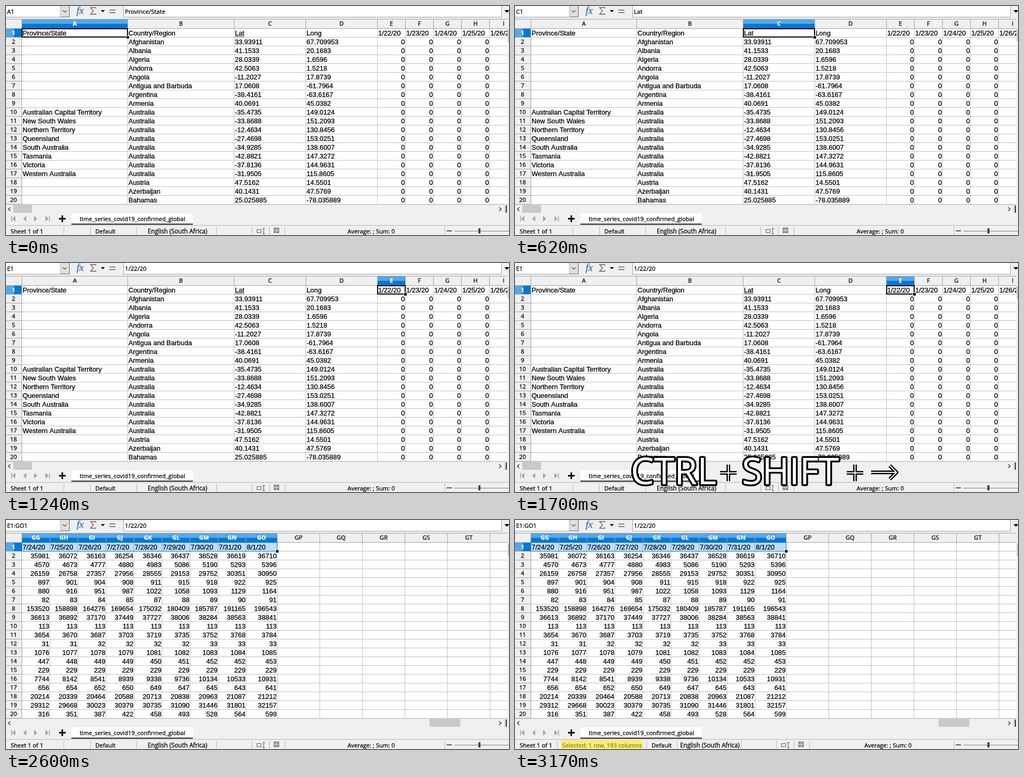
Write an HTML page with a canvas that moves like this. It is 969 px wide and 443 px high and loops after 4.07 s.

```html
<!DOCTYPE html>
<html lang="en">
<head>
<meta charset="utf-8">
<title>Spreadsheet: select to the end of the row</title>
<style>
html, body { margin: 0; width: 100%; height: 100%; overflow: hidden; background: #f0f0f0; }
canvas { display: block; }
</style>
</head>
<body>
<canvas id="stage" width="969" height="443"></canvas>
<script>
const ctx = document.getElementById('stage').getContext('2d');
const LOOP = 4070, TOP = 43, ROW = 17, RIGHT = 966;
const UI = '"Open Sans", "Noto Sans", sans-serif';
const CELL = '13px "Liberation Sans", Arial, sans-serif';
const FACE = '#f0f0f0', GRID = '#c0c0c0', EDGE = '#a0a0a0', BLUE = '#0078d7', LIGHT = '#55a8e8';

// province | country | lat | long | first and last count of the second view
const places = `Province/State|Country/Region|Lat|Long
|Afghanistan|33.93911|67.709953|35981|36710
|Albania|41.1533|20.1683|4570|5396
|Algeria|28.0339|1.6596|26159|30950
|Andorra|42.5063|1.5218|897|925
|Angola|-11.2027|17.8739|880|1164
|Antigua and Barbuda|17.0608|-61.7964|82|91
|Argentina|-38.4161|-63.6167|153520|196543
|Armenia|40.0691|45.0382|36613|38841
Australian Capital Territory|Australia|-35.4735|149.0124|113|113
New South Wales|Australia|-33.8688|151.2093|3654|3784
Northern Territory|Australia|-12.4634|130.8456|31|33
Queensland|Australia|-27.4698|153.0251|1076|1085
South Australia|Australia|-34.9285|138.6007|447|453
Tasmania|Australia|-42.8821|147.3272|229|229
Victoria|Australia|-37.8136|144.9631|7744|10931
Western Australia|Australia|-31.9505|115.8605|656|641
|Austria|47.5162|14.5501|20214|21212
|Azerbaijan|40.1431|47.5769|29312|32157
|Bahamas|25.025885|-78.035889|316|599`.split('\n').map(line => line.split('|'));

const list = (n, rule) => Array.from({ length: n }, (_, i) => rule(i));
const letter = i => String.fromCharCode(65 + i);
const startEdges = [30, 234, 439, 577, ...list(6, i => 715 + 54 * i)];
const endEdges = list(16, i => i < 9 ? 30 + 54 * i : 522 + 82 * (i - 9) - (i > 9 ? 0 : 6 - 6));
const startTitles = [...places[0], ...list(5, i => `1/${22 + i}/20`)];
const endTitles = list(9, i => i < 8 ? `7/${24 + i}/20` : '8/1/20');

function box(x, y, w, h, color) {
  ctx.fillStyle = color;
  ctx.fillRect(x, y, w, h);
}
function frame(x, y, w, h, color, width = 1) {
  ctx.strokeStyle = color;
  ctx.lineWidth = width;
  ctx.strokeRect(x, y, w, h);
}
// a hairline stroke gives the dense look of hinted screen text
function text(s, x, y, font, color = '#000', align = 'left') {
  ctx.font = font;
  ctx.fillStyle = ctx.strokeStyle = color;
  ctx.textAlign = align;
  ctx.lineWidth = 0.3;
  ctx.fillText(s, x, y);
  ctx.strokeText(s, x, y);
}
const ui = (s, x, y, size = 11.4) => text(s, x, y, `${size}px ${UI}`);
function line(points, color, width = 1) {
  ctx.beginPath();
  points.forEach(([x, y]) => ctx.lineTo(x, y));
  ctx.strokeStyle = color;
  ctx.lineWidth = width;
  ctx.stroke();
}
function triangle(x, y, dx, dy, color) {
  // tip at x, y; the base lies dx or dy away
  const half = (dx ? Math.abs(dx) * 0.92 : Math.abs(dy));
  ctx.beginPath();
  ctx.moveTo(x, y);
  ctx.lineTo(x + (dx || -half), y + (dy || -half));
  ctx.lineTo(x + (dx || half), y + (dy || half));
  ctx.fillStyle = color;
  ctx.fill();
}

function toolbar(name, formula) {
  box(0, 0, 123, 22, EDGE);
  box(0, 0, 122, 21, '#fff');
  box(105, 0, 17, 21, EDGE);
  box(106, 0, 15, 20, '#e1e1e1');
  line([[109.5, 8.5], [113, 12], [116.5, 8.5]], '#444', 1.2);
  ui(name, 2, 15);
  text('fx', 136, 15, 'italic 19px "Liberation Serif", serif', '#2f6fae');
  line([[173, 5], [173, 3], [163, 3], [168.5, 9.5], [163, 16], [173, 16], [173, 14]], '#606060', 1.4);
  triangle(186.5, 12, 0, -4, '#000');
  box(199, 7, 12, 1.4, '#555');
  box(199, 12, 12, 1.4, '#555');
  box(226, 0, 729, 22, EDGE);
  box(227, 0, 727, 21, '#fff');
  ui(formula, 229, 15, 11.6);
  triangle(965, 13, 0, -5, '#000');
}

function header(label, x, y, w, h, on, vertical) {
  box(x, y, w, h, on ? BLUE : FACE);
  if (on) vertical ? box(x, y, w / 2, h, LIGHT) : box(x, y, w, h / 2, LIGHT);
  const cx = vertical ? 14.5 : x + w / 2;
  const font = `${on ? 'bold ' : ''}11.4px ${UI}`;
  text(label, cx, Math.floor(y + h / 2 + 4), font, on ? '#fff' : '#000', 'center');
}

function sheet(edges, labels, isOn) {
  box(0, 25, RIGHT, 359, '#fff');
  for (let r = 0; r < 20; r++) {
    const y = TOP + r * ROW;
    header(r + 1, 0, y + 1, 30, ROW - 1, r === 0, true);
    box(0, y + ROW, 30, 1, EDGE);
    box(31, y + ROW, RIGHT - 31, 1, GRID);
  }
  box(0, 25, 30, 18, FACE);
  labels.forEach((label, i) => {
    const x = edges[i], w = edges[i + 1] - x;
    header(label, x + 1, 26, w - 1, 17, isOn(i), false);
    box(x + w, TOP, 1, 341, GRID);
    box(x + w, 25, 1, 18, EDGE);
  });
  box(30, 25, 1, 359, EDGE);
  box(0, 25, RIGHT, 1, EDGE);
  box(0, TOP, RIGHT, 1, EDGE);
}

function cell(s, edges, col, row, right) {
  const y = TOP + row * ROW + 14;
  right ? text(s, edges[col + 1] - 0.5, y, CELL, '#000', 'right')
        : text(s, edges[col] + 2, y, CELL);
}

function handle(x) {
  box(x - 3, 57, 6, 6, '#fff');
  box(x - 2, 58, 5, 5, '#000');
}

function startView(active) {
  const e = startEdges;
  sheet(e, startTitles.map((_, i) => letter(i)), i => i === active);
  startTitles.forEach((s, i) => cell(s, e, i, 0));
  for (let r = 1; r < 20; r++) {
    places[r].slice(0, 4).forEach((s, i) => cell(s, e, i, r));
    for (let i = 4; i < 9; i++) cell('0', e, i, r, true);
  }
  if (active !== 2) line(list(10, i => [441 + 2 * i, i % 2 ? 58.2 : 60]), '#333');
  const x = e[active], x2 = e[active + 1];
  frame(x + 1, 44, x2 - x - 1, 16, '#000', 2);
  handle(x2);
}

function endView(selected) {
  const e = endEdges;
  sheet(e, list(15, i => 'G' + letter(6 + i)), i => i < 9);
  if (selected) {
    box(31, 44, 491, 16, 'rgba(0,120,215,.25)');
    frame(30.5, 43.5, 492, 17, BLUE);
    handle(522);
  }
  endTitles.forEach((s, i) => cell(s, e, i, 0));
  for (let r = 1; r < 20; r++) {
    const [first, last] = places[r].slice(4).map(Number);
    for (let i = 0; i < 9; i++) cell(Math.round(first + (last - first) * i / 8), e, i, r, true);
  }
}

function bottomBars(moved) {
  box(RIGHT, 25, 3, 359, FACE);
  box(967, 45, 2, 24, '#bdbdbd');
  box(0, 384, 969, 59, FACE);
  box(0, 384, 969, 1, '#d8d8d8');
  moved ? box(816, 385, 59, 15, '#c9c9c9') : box(14, 385, 36, 15, '#c9c9c9');
  line([[8.5, 389.5], [4.5, 393], [8.5, 396.5]], '#333', 1.4);
  line([[950, 389.5], [954, 393], [950, 396.5]], '#333', 1.4);
  box(961, 386, 1, 14, EDGE);
  box(963, 386, 2, 14, '#333');

  const nav = '#a6a6a6';
  box(10, 406, 1.5, 11, nav);
  triangle(12, 411.5, 6, 0, nav);
  triangle(33, 411.5, 6, 0, nav);
  triangle(60, 411.5, -6, 0, nav);
  triangle(82, 411.5, -6, 0, nav);
  box(83, 406, 1.5, 11, nav);
  box(102, 410, 13, 3, '#000');
  box(107, 405, 3, 13, '#000');
  box(126, 401, 234, 20, '#fff');
  box(126, 421, 234, 2, '#222');
  ui('time_series_covid19_confirmed_global', 142, 416);
}

function statusBar(wide) {
  const dx = wide ? 30 : 0;
  box(0, 424, 969, 1, '#b4b4b4');
  const bars = wide ? [81, 253, 312, 435] : [111, 162, 251, 405];
  [...bars, 473 + dx, 507 + dx, 537 + dx, 845].forEach(x => box(x, 427, 1, 16, '#b8b8b8'));
  ui('Sheet 1 of 1', 9, 440);
  if (wide) ui('Selected: 1 row, 193 columns', 91, 440);
  ui('Default', wide ? 263 : 172, 440);
  ui('English (South Africa)', wide ? 318 : 273, 440, 11.7);
  ui('Average: ; Sum: 0', wide ? 673 : 658, 440);

  frame(483.5 + dx, 432.5, 8, 6, '#555');
  box(496 + dx, 431, 1, 9, '#555');
  box(494 + dx, 430, 5, 1, '#555');
  box(494 + dx, 440, 5, 1, '#555');
  frame(516.5 + dx, 429.5, 9, 9, '#444');
  frame(518.5 + dx, 429.5, 5, 3, '#444');
  frame(518.5 + dx, 435.5, 5, 3, '#444');

  box(849, 434, 10, 2, '#555');
  box(864, 435, 105, 1, '#777');
  box(910, 430, 4, 10, '#444');
}

function shortcut() {
  const signs = new Path2D('M411 390V422M395 406H427M655 390V422M639 406H671M686 405H735M722 392L735 405L722 418');
  const words = [['CTRL', 223], ['SHIFT', 437]];
  ctx.lineJoin = 'round';
  ctx.textAlign = 'left';
  ctx.font = `71px ${UI}`;
  ctx.strokeStyle = '#000';
  ctx.lineWidth = 7;
  words.forEach(([s, x]) => ctx.strokeText(s, x, 428));
  ctx.stroke(signs);
  ctx.fillStyle = ctx.strokeStyle = '#fff';
  ctx.lineWidth = 2;
  words.forEach(([s, x]) => ctx.fillText(s, x, 428));
  ctx.stroke(signs);
  ctx.lineJoin = 'miter';
}

function highlight() {
  ctx.beginPath();
  ctx.roundRect(88, 426, 159, 18, 6);
  ctx.fillStyle = 'rgba(255,235,20,.55)';
  ctx.fill();
}

function draw(now) {
  const t = now % LOOP;
  const active = [370, 620, 920, 1240].filter(at => t >= at).length;
  const selected = t >= 2600;
  box(0, 0, 969, 443, FACE);
  toolbar(selected ? 'E1:GO1' : letter(active) + '1', startTitles[active]);
  t < 2530 ? startView(active) : endView(selected);
  bottomBars(selected);
  statusBar(t >= 2850);
  if (t >= 1700 && t < 2530) shortcut();
  if (t >= 3170) highlight();
}

const begin = performance.now();
function tick() {
  draw(performance.now() - begin);
  requestAnimationFrame(tick);
}
tick();
</script>
</body>
</html>
```
